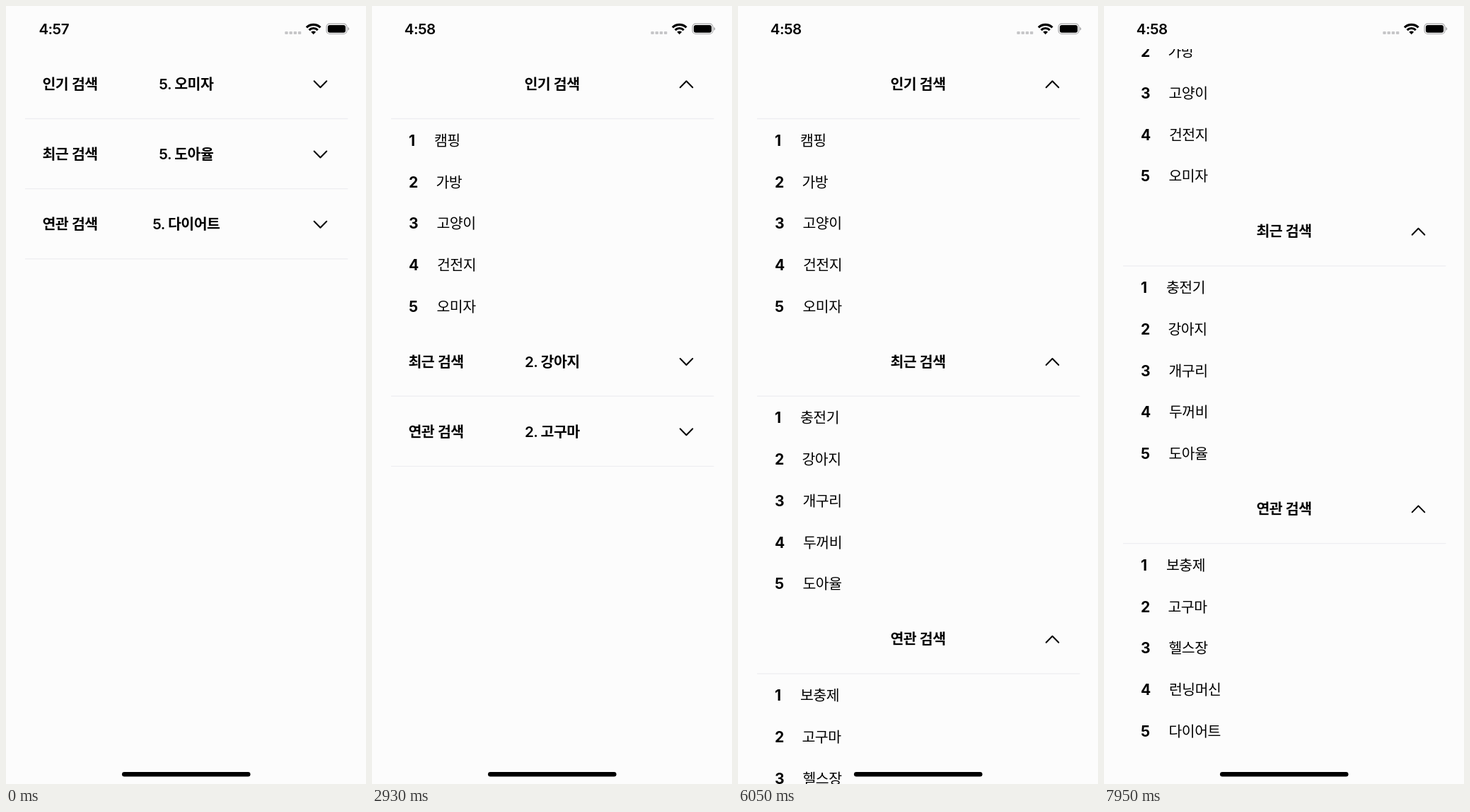
An HTML page for the animation above (8 s loop, 509 by 1101 pixels).

```html
<!DOCTYPE html>
<html lang="ko">
<head>
<meta charset="utf-8">
<title>검색 순위</title>
<style>
html, body { margin: 0; width: 100%; height: 100%; overflow: hidden; background: #fcfcfc; }
svg { display: block; }
text { font: 400 20.5px Inter, "Noto Sans CJK KR", sans-serif; letter-spacing: -.5px; }
.head { font-weight: 600; }
.num { font-weight: 700; font-size: 21px; }
.mid { text-anchor: middle; }
.chev { fill: none; stroke: #000; stroke-width: 2; stroke-linecap: round; stroke-linejoin: round; }
</style>
</head>
<body>
<svg width="509" height="1101" viewBox="0 0 509 1101">
  <clipPath id="view"><rect y="61" width="509" height="1040"/></clipPath>
  <g clip-path="url(#view)"><g id="page"></g></g>
  <text id="clock" class="head mid" x="67.7" y="40"></text>
  <g fill="#c6c6c8">
    <rect x="394.3" y="36" width="4.4" height="4" rx="1"/>
    <rect x="400.5" y="36" width="4.4" height="4" rx="1"/>
    <rect x="406.7" y="36" width="4.4" height="4" rx="1"/>
    <rect x="412.9" y="36" width="4.4" height="4" rx="1"/>
  </g>
  <g transform="translate(434.7 40.2)" fill="none" stroke="#000" stroke-width="3.1">
    <path d="M-9.8-9.8A13.9 13.9 0 0 1 9.8-9.8M-6.1-6.1A8.6 8.6 0 0 1 6.1-6.1"/>
    <path d="M0 0L-3.4-3.4A4.8 4.8 0 0 1 3.4-3.4Z" fill="#000" stroke="none"/>
  </g>
  <rect x="453.1" y="25.1" width="28.8" height="14.4" rx="4.5" fill="none" stroke="#a6a6a8" stroke-width="1.2"/>
  <rect x="454.9" y="26.9" width="25.2" height="10.8" rx="3" />
  <path d="M483.4 29.8q1.8 .8 1.8 2.5t-1.8 2.5z" fill="#a6a6a8"/>
  <rect x="164" y="1084" width="181.5" height="6.5" rx="3.25"/>
</svg>
<script>
const LOOP = 8000, STEP = 94.6, OPEN_MS = 350;
const TOP = 110.5, ROW = 99.2, LIST = 293.5;
const ITEM_X = [88, 90.5, 91.5, 92, 91.5];

const sections = [
  { title: '인기 검색', opens: 1832, items: ['캠핑', '가방', '고양이', '건전지', '오미자'] },
  { title: '최근 검색', opens: 4360, items: ['충전기', '강아지', '개구리', '두꺼비', '도아율'] },
  { title: '연관 검색', opens: 5700, items: ['보충제', '고구마', '헬스장', '런닝머신', '다이어트'] },
];
// Steps during which the picture stands still: [from, until]
const stalls = [[22, 31], [49, 59]];
// Drag past the end, then spring back: [step, offset]
const drag = [[0, 0], [75, 9], [76, 130], [77, 249], [79, 256], [83, 222], [84, 184.3]];

const page = document.getElementById('page');
const clock = document.getElementById('clock');

function add(parent, tag, attrs, text = '') {
  const el = document.createElementNS('http://www.w3.org/2000/svg', tag);
  for (const key in attrs) el.setAttribute(key, attrs[key]);
  el.textContent = text;
  parent.append(el);
  return el;
}

for (const s of sections) {
  s.g = add(page, 'g', {});
  s.closed = add(s.g, 'g', {});
  s.opened = add(s.g, 'g', {});
  add(s.g, 'path', { d: 'M27 49H483.5', stroke: '#eeeef1', 'stroke-width': 1.3 });
  add(s.closed, 'text', { class: 'head', x: 51.5, y: 7.5 }, s.title);
  s.ticker = add(s.closed, 'text', { class: 'head mid', x: 254.8, y: 7.5 });
  add(s.closed, 'path', { class: 'chev', d: 'M435.7-4.2l8.8 9 8.8-9' });
  add(s.opened, 'text', { class: 'head mid', x: 254.5, y: 7.5 }, s.title);
  add(s.opened, 'path', { class: 'chev', d: 'M435.7 4.8l8.8-9 8.8 9' });
  s.items.forEach((item, i) => {
    const y = 87.3 + 58.7 * i;
    add(s.opened, 'text', { class: 'num', x: 52, y }, i + 1);
    add(s.opened, 'text', { x: ITEM_X[i], y }, item);
  });
}

// cubic-bezier(.42, 0, .58, 1)
function easeInOut(x) {
  if (x <= 0) return 0;
  if (x >= 1) return 1;
  let lo = 0, hi = 1;
  for (let i = 0; i < 20; i++) {
    const u = (lo + hi) / 2;
    if (1.26 * u - .78 * u * u + .52 * u ** 3 < x) lo = u; else hi = u;
  }
  return lo * lo * (3 - 2 * lo);
}

function draw(ms) {
  let step = Math.floor((ms + 5) / STEP);
  const stall = stalls.find(([from, until]) => step >= from && step < until);
  if (stall) step = stall[0];

  const rank = (Math.floor((step + 1) / 16) + 4) % 5;
  const scroll = drag.findLast(([from]) => step >= from)[1];
  clock.textContent = step < 14 ? '4:57' : '4:58';
  page.setAttribute('transform', `translate(0 ${-scroll})`);

  let y = TOP;
  for (const s of sections) {
    const p = easeInOut((step * STEP - s.opens) / OPEN_MS);
    s.g.setAttribute('transform', `translate(0 ${y})`);
    s.closed.setAttribute('opacity', 1 - p);
    s.opened.setAttribute('opacity', p);
    s.ticker.textContent = `${rank + 1}. ${s.items[rank]}`;
    y += ROW + LIST * p;
  }
}

const start = performance.now();
function tick() {
  draw((performance.now() - start) % LOOP);
  requestAnimationFrame(tick);
}
tick();
</script>
</body>
</html>
```
